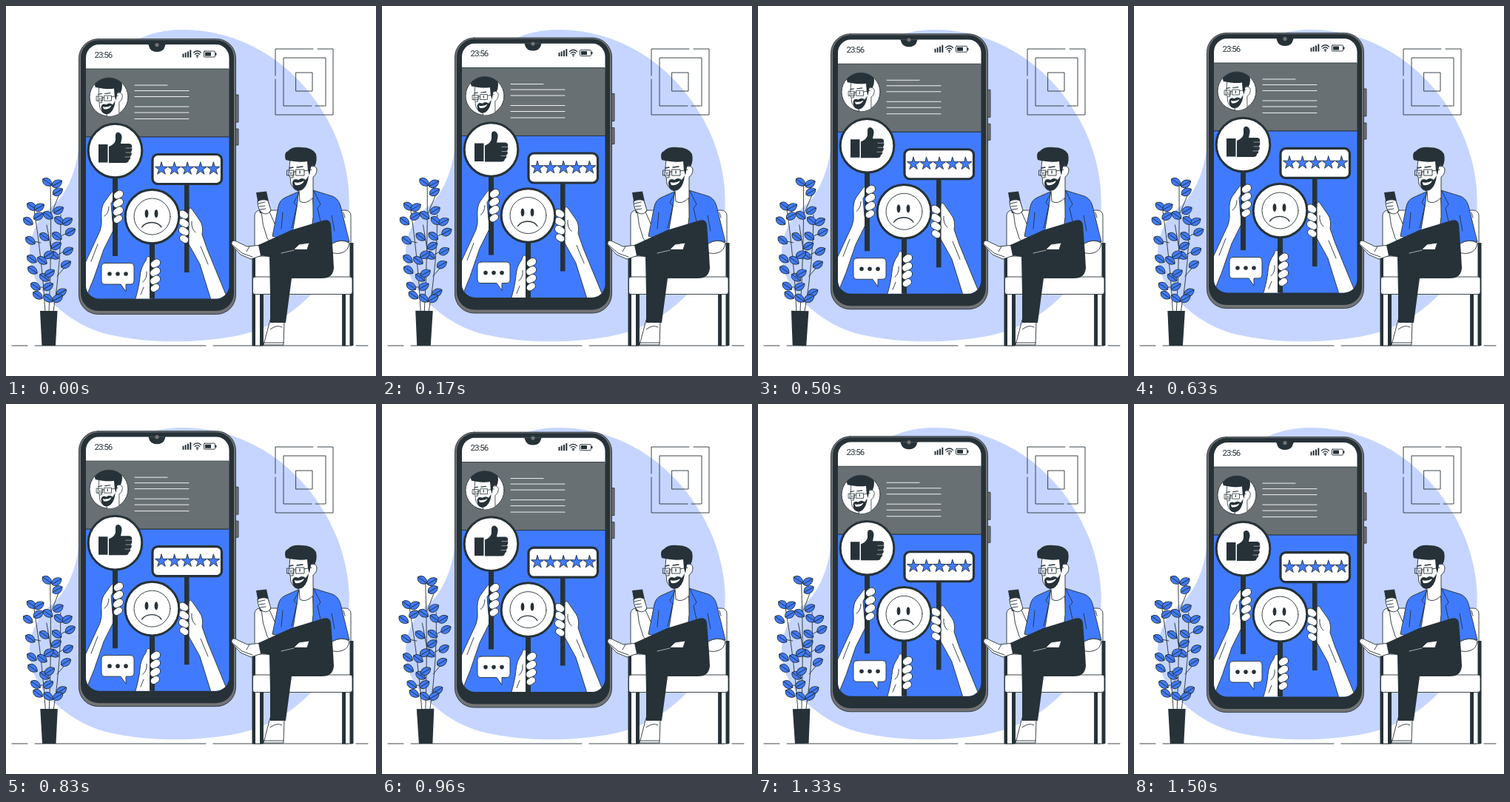
An HTML page that plays this animation: 500 by 500 pixels, repeating every 1.54 s.

```html
<!DOCTYPE html>
<html lang="en">
<head>
<meta charset="utf-8">
<title>Customer feedback</title>
<style>
  html, body { margin: 0; width: 100%; height: 100%; overflow: hidden; background: #fff }
  svg { display: block; width: 100%; height: 100%; stroke-linejoin: round; stroke-linecap: round }
  .o { fill: #fff; stroke: #263238; stroke-width: .9 }
  .d { fill: #263238; stroke: none }
  .b { fill: #407bff }
  .n { fill: none }
  .w { stroke: #fff }
  text { font: 11.5px Roboto, "Open Sans", sans-serif; letter-spacing: -1px }
</style>
</head>
<body>
<svg viewBox="0 0 500 500">
  <defs>
    <clipPath id="screen"><rect x="108" y="52" width="193.500" height="343.500" rx="18"/></clipPath>
    <clipPath id="badge"><circle cx="139" cy="123" r="26"/></clipPath>
    <g id="head">
      <path d="M384 206L383 219 382 229 384 231 385 240Q388 248 396 250L397 264Q405 269 415 259V231Q420 228 420 221 419 215 413 217L407 203Z"/>
      <path class="d" d="M378 208Q375 198 381 196 386 190 399 191 414 191 419 200 421 210 417 217 413 214 412 218L410 229 408 222 407 210Q396 212 378 208Z"/>
      <path class="d" d="M387 238Q389 232 395 235 400 231 405 235L409 229Q408 241 402 247 397 252 390 248 387 245 387 238Z"/>
      <path stroke="none" d="M389.500 238Q396 240 403 236 400 243 391 242Z"/>
      <path class="n" d="M380 222H389V229H380ZM392 221H403V229H392ZM389 224H392M403 223L413 221M388 224V232L385 232"/>
      <path class="n" d="M385 225V227M397 223V226M383 219L388 218M393 218L401 217" stroke-width="1.300"/>
    </g>
  </defs>

  <path fill="#c5d5ff" d="M237 32C325 32 395 83 433 151 459 197 468 247 462 290 454 340 436 366 412 390 388 415 354 438 310 446 251 457 187 455 139 444 102 435 77 415 58 397 42 379 32 357 32 335 32 305 46 284 62 271 82 255 94 224 98 195 104 95 153 33 237 32Z"/>

  <g class="o n">
    <path d="M415 58H364V94M364 99V147H442V58H421M413 135H375V70H432V135H418M392 90H414V115H392Z"/>
    <path d="M8 459H29M39 459H270M280 459H462M473 459H489"/>
  </g>

  <g id="plant" class="o">
    <path class="n" d="M53 413Q49 345 38 275M58 413Q62 330 60 240M64 413Q75 345 74 282M51 380L40 380M60 342L81 330M69 365L83 349M47 320L33 317M60 284L72 254M61 330L55 296M72 312L88 304M62 400L75 387"/>
    <path class="d" d="M46 412H69.500L67 459H48.500Z"/>
  </g>

  <g id="phone" class="o">
    <path fill="#737375" d="M308 120H314V157H308ZM308 166H314V188H308Z"/>
    <rect x="98.500" y="44.500" width="212" height="372" rx="26" fill="#737375"/>
    <rect class="d" x="101" y="46" width="207" height="366" rx="24"/>
    <g clip-path="url(#screen)">
      <path stroke="none" d="M108 52H302V86H108Z"/>
      <path fill="#697073" d="M107 85H303V177H107Z"/>
      <path class="b" d="M107 177H303V397H107Z"/>
      <path class="d" d="M188 51Q193 51 193 54 195 62 204 62 213 62 215 54 215 51 220 51Z"/>
      <text class="d" x="119.500" y="69.700">23:56</text>
      <path class="n" stroke-width="2" stroke-linecap="butt" d="M239.500 69.500V64.500M242.700 69.500V63M246 69.500V61.500M249.300 69.500V59.500"/>
      <path class="n" stroke-width="1.300" d="M253.500 63Q258.500 58.500 263.500 63M255.300 65.300Q258.500 62.300 261.700 65.300M257.200 67.400Q258.500 66 259.800 67.400"/>
      <circle class="d" cx="258.500" cy="69" r="1"/>
      <rect class="n" x="267.500" y="61" width="15" height="8" rx="1"/>
      <path class="d" d="M269 62.500H277V67.500H269ZM283 63.500H284.500V66.500H283Z"/>

      <circle cx="139" cy="123" r="26"/>
      <g clip-path="url(#badge)">
        <use href="#head" transform="translate(139 95) scale(.87) translate(-399 -191)"/>
      </g>
      <path class="n w" d="M174 107H218M174 114.500H247M174 122.500H247M174 136H247M174 144H247M174 152.500H247"/>

      <path d="M100 370L108 345 127 304Q130 296 129 286 128 272 133 265L141 254Q147 246 148 251 147 261 142 267L144 291 147 299Q139 315 132 329L119 367 106 399Z"/>
      <path class="d" d="M144 230H151V338H144Z"/>
      <g id="grip">
        <rect x="145" y="250" width="14" height="10" rx="5" transform="rotate(-35 152 255)"/>
        <rect x="144" y="261" width="15" height="10" rx="5" transform="rotate(-35 152 266)"/>
        <rect x="144" y="272" width="15" height="10" rx="5" transform="rotate(-35 152 277)"/>
        <rect x="145" y="283" width="13" height="9" rx="4.500" transform="rotate(-35 152 288)"/>
      </g>
      <path class="n" d="M133 284Q139 280 139 271M115 345L124 322"/>
      <circle cx="147.500" cy="195.500" r="36.300" stroke-width="3"/>
      <path class="d" d="M125 187H137.500V211.500H125ZM139 190Q147 187 148 181V174Q149 170 153 171 158 174 156 181L155 186H167Q171 187 170 191 171 195 169 197 171 201 168 203 169 207 166 208 166 212 161 212H139Z"/>
      <path class="n w" stroke-width=".5" d="M162 192H170M162 198H169M161 204H168"/>

      <path d="M246 320Q239 307 245 290L247 275Q249 270 253 277L262 290Q267 297 265 309L272 329 300 397H277L262 349Z"/>
      <path class="d" d="M241 240H247.500V360H241Z"/>
      <use href="#grip" transform="translate(392 27) scale(-1 1)"/>
      <path class="n" d="M251 291Q250 301 256 306M263 325L273 349"/>
      <rect x="198" y="200.500" width="93.500" height="40" rx="7" stroke-width="3.200"/>
      <g id="stars" class="b"></g>

      <path d="M174 399Q180 379 181 366 182 353 189 344 191 335 195 340L195 359 197 399Z"/>
      <path class="d" d="M194 320H201V397H194Z"/>
      <use href="#grip" transform="translate(50 93)"/>
      <path class="n" d="M185 373Q191 368 190 359M182 390L186 380"/>
      <circle cx="197.500" cy="284.500" r="36.300" stroke-width="3"/>
      <circle cx="197.500" cy="284.500" r="24.500"/>
      <ellipse class="d" cx="190" cy="280.500" rx="2.400" ry="5.500"/>
      <ellipse class="d" cx="203" cy="280.500" rx="2.400" ry="5.500"/>
      <path class="n" stroke-width="1.300" d="M183.500 299Q188 292.500 197 292.500 206 292.500 210 299"/>

      <path d="M134 347.500H168Q173 347.500 173 353V371Q173 376 168 376H162L162 386 155 376H134Q129 376 129 371V353Q129 347.500 134 347.500Z"/>
      <path class="n" stroke-width="5.600" d="M140 362H140.010M151 362H151.010M162 362H162.010"/>
    </g>
    <circle cx="204" cy="52.500" r="2.600" fill="#737375" stroke="none"/>
  </g>

  <g class="o">
    <rect x="336" y="276" width="130" height="94" rx="7"/>
    <path d="M335 338H362V370H335Z"/>
    <path d="M334 380H347V459H334ZM455 380H468V459H455Z"/>
    <path class="d" d="M332.500 340H337V459H332.500ZM343 388H348V459H343ZM454.500 388H459V459H454.500ZM464.500 320H469.500V459H464.500Z"/>
    <rect x="333.500" y="366" width="134.500" height="23.500" rx="3"/>

    <path d="M345 278L355 276 363 294 372 306 366 319Q357 321 353 314 346 296 345 278Z"/>
    <path d="M393 254L414 251 419 316H384Z"/>
    <path class="b" d="M395 251L377 259Q370 262 368 271L360 311 372 314H386L394 265Z"/>
    <path class="b" d="M415 249L441 257Q449 260 452 270L464 319Q451 315 443 320L440 330H410L415 285Z"/>
    <path class="n" d="M396 252L389 266 393 270 386 300M416 250L425 268 421 273 425 291M374 279L372 301M440 283L444 304M456 279L458 286"/>
    <path d="M441 321Q453 314 464 320 463 330 455 333 447 336 440 333Z"/>
    <use href="#head"/>

    <path class="d" d="M338 252L352 250.500 358 278 343 280Z"/>
    <path d="M340 264Q347 260 354 263L358 276Q354 283 347 280 340 276 340 264Z"/>
    <path class="n" d="M341 267L350 265M342 271L350 270M343 275L351 274"/>

    <path d="M357 424L352 443 348 458H375L376 426Z"/>
    <path class="n" d="M348 455H375M357 437Q366 430 373 434"/>
    <path d="M345 323L326 325 309 317Q304 317 305 323L317 336 331 342 346 337Z"/>
    <path class="n" d="M305 322L319 334 333 339M329 325L325 332"/>
    <path class="d" d="M341 323L385 303 428 290Q437 287 439 295L442 335 443 354Q442 368 427 368H386L378 428H357V388L356 339 344 337Z"/>
    <path d="M389 329L396 322 410 320 407 329Z"/>
    <path class="n w" stroke-width=".6" d="M372 334L389 330"/>
  </g>
</svg>
<script>
const PERIOD = 1540;
const byId = id => document.getElementById(id);
const phone = byId('phone'), plant = byId('plant');

// Leaf centres, keyed by the leaf's angle
const leaves = {
  35: [56,238, 35,271, 30,291, 57,283, 33,317, 52,312, 35,342, 49,344, 36,357, 52,367, 40,379, 43,391, 57,395, 72,290, 69,311, 65,337],
  '-30': [69,240, 70,251, 45,272, 44,284, 71,276, 83,291, 87,305, 68,324, 84,331, 58,336, 81,349, 59,361, 57,379, 75,387, 70,395]
};
let leafMarkup = '';
for (const [angle, points] of Object.entries(leaves))
  for (let i = 0; i < points.length; i += 2)
    leafMarkup += `<path class="b" transform="translate(${points[i]} ${points[i + 1]}) rotate(${angle})" d="M-7.5 0C-5 -7 4 -6 7.5 0 4 6 -5 7 -7.5 0H7"/>`;
plant.insertAdjacentHTML('beforeend', leafMarkup);

const star = Array.from({ length: 10 }, (_, i) => {
  const r = i % 2 ? 3.5 : 9, a = (i / 5 - .5) * Math.PI;
  return `${r * Math.cos(a)},${r * Math.sin(a)}`;
}).join(' ');
byId('stars').innerHTML = [0, 1, 2, 3, 4].map(i =>
  `<polygon points="${star}" transform="translate(${210 + 17.6 * i} 220)"/>`).join('');

function draw(now) {
  const phase = now / PERIOD * 2 * Math.PI;
  phone.setAttribute('transform', `translate(0 ${4.2 * Math.cos(phase + .21) - 4.1})`);
  plant.setAttribute('transform', `rotate(${Math.sin(phase)} 58 345)`);
  requestAnimationFrame(draw);
}
draw(performance.now());
</script>
</body>
</html>
```
